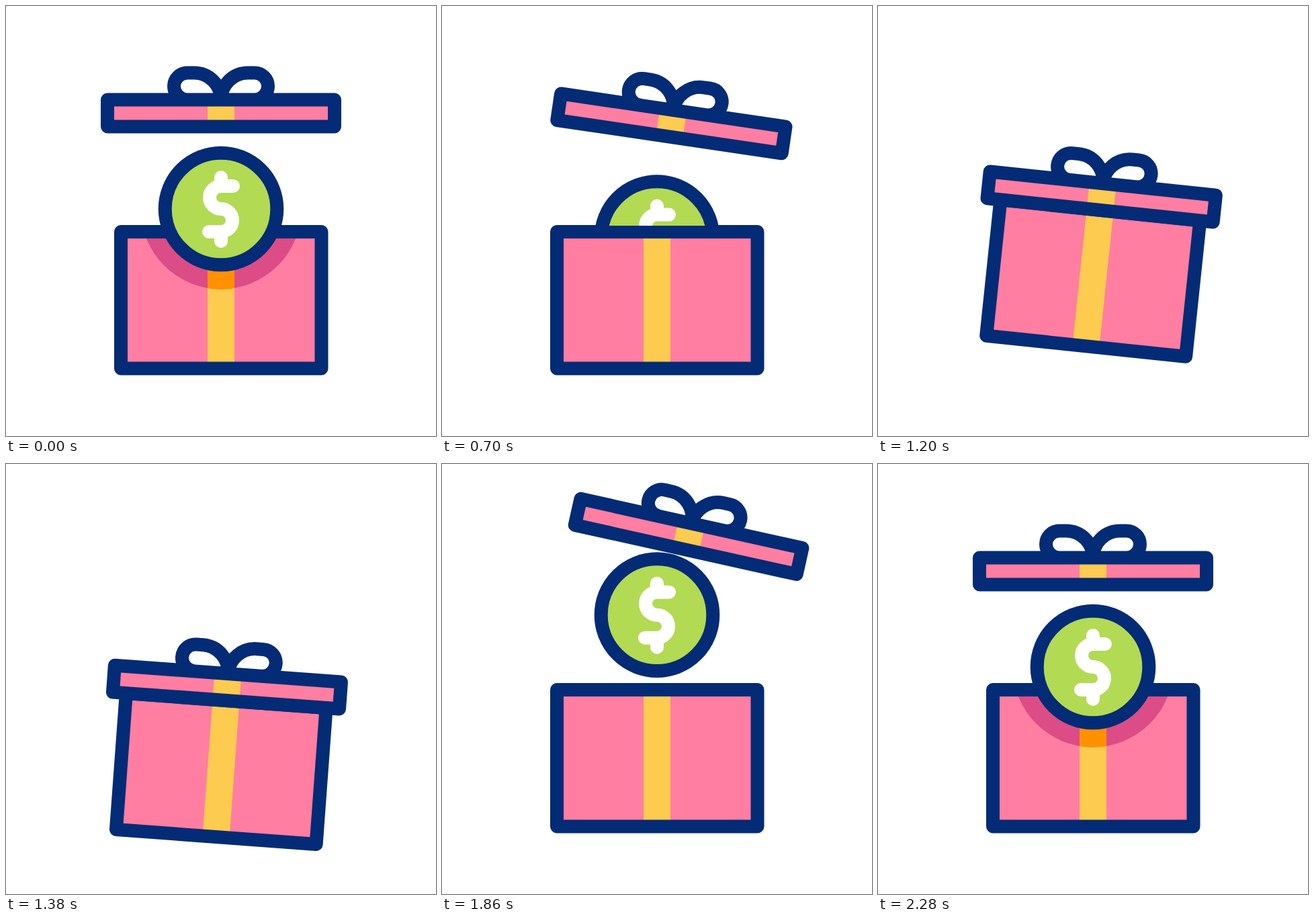
An HTML page that plays this animation: 640x640 px, repeating every 2400 ms.

```html
<!DOCTYPE html>
<html lang="en">
<head>
<meta charset="utf-8">
<title>Gift box</title>
<style>
  html, body { margin: 0; height: 100%; overflow: hidden; background: #fff; }
  svg { display: block; width: 100%; height: 100%; }
  .line { fill: none; stroke: #042b75; stroke-width: 20; stroke-linecap: round; stroke-linejoin: round; }
  .pink { fill: #ff7ea1; }
  .yellow { fill: #fdcb50; }
</style>
</head>
<body>
<svg viewBox="0 0 640 640">
  <clipPath id="shadeClip"><circle id="shade" cx="320" r="119.5"/></clipPath>
  <clipPath id="coinClip"><rect id="coinArea" width="640"/></clipPath>

  <g id="box">
    <rect class="pink" x="171" y="336" width="298.5" height="203.5"/>
    <rect class="yellow" x="300" y="336" width="40" height="203.5"/>
    <g clip-path="url(#shadeClip)">
      <rect fill="#dc4c86" x="171" y="336" width="298.5" height="203.5"/>
      <rect fill="#ff9100" x="300" y="336" width="40" height="203.5"/>
    </g>
    <rect class="line" x="171" y="336" width="298.5" height="203.5"/>
  </g>

  <g clip-path="url(#coinClip)">
    <g id="coin">
      <circle class="line" r="83.3" style="fill:#b2da53"/>
      <path class="line" style="stroke:#fff" d="M18-34H0a17 17 0 0 0 0 34a17 17 0 0 1 0 34H-18M0-47v13M0 34v14"/>
    </g>
  </g>

  <g id="lidFrame">
    <g id="lid">
      <rect class="pink" x="151" y="139.5" width="338" height="40"/>
      <rect class="yellow" x="300" y="139.5" width="40" height="40"/>
      <path class="line" d="M151 139.5h338v40h-338z
        M320 139.5a40 40 0 0 0-40-40h-10a20 20 0 0 0 0 40
        M320 139.5a40 40 0 0 1 40-40h10a20 20 0 0 1 0 40"/>
    </g>
  </g>
</svg>
<script>
const LOOP = 2400, SWING = 13;
const OPEN_TIMES = [0, 540, 940, 1512, 1907, 2280];
const HOP_TIMES = [900, 1050, 1220, 1460, 1675];
const el = id => document.getElementById(id);
const set = (id, name, value) => el(id).setAttribute(name, value);

// Eased value at time t through a row of keyframes
function track(t, times, values) {
  const next = times.findIndex(time => time > t);
  if (next < 0) return values[values.length - 1];
  if (next === 0) return values[0];
  const u = (t - times[next - 1]) / (times[next] - times[next - 1]);
  return values[next - 1] + (values[next] - values[next - 1]) * u * u * (3 - 2 * u);
}

function draw(t) {
  const open = track(t, OPEN_TIMES, [0, 1, 0, 0, 1, 0]);
  const coinY = track(t, OPEN_TIMES, [302, 210.5, 587.5, 587.5, 210.5, 302]);
  const inFront = t < OPEN_TIMES[1] || t >= OPEN_TIMES[4];
  const lift = inFront ? 65 * open ** 0.72 : 221.5 * open - 156.5;

  const drop = track(t, HOP_TIMES, [0, 32, -35, 33, 0]);
  const tilt = track(t, HOP_TIMES, [0, -3, 6.3, 3.5, 0]);
  const hop = `translate(0 ${drop}) rotate(${tilt} 320 437.75)`;

  set('box', 'transform', hop);
  set('lidFrame', 'transform', hop);
  set('lid', 'transform', `rotate(${SWING * open} 320 320) translate(0 ${-lift})`);
  set('coin', 'transform', `translate(320 ${coinY})`);
  set('coinArea', 'height', inFront ? 640 : 327);
  set('shade', 'cy', inFront ? coinY : -200);
}

function frame() {
  draw(performance.now() % LOOP);
  requestAnimationFrame(frame);
}
frame();
</script>
</body>
</html>
```
